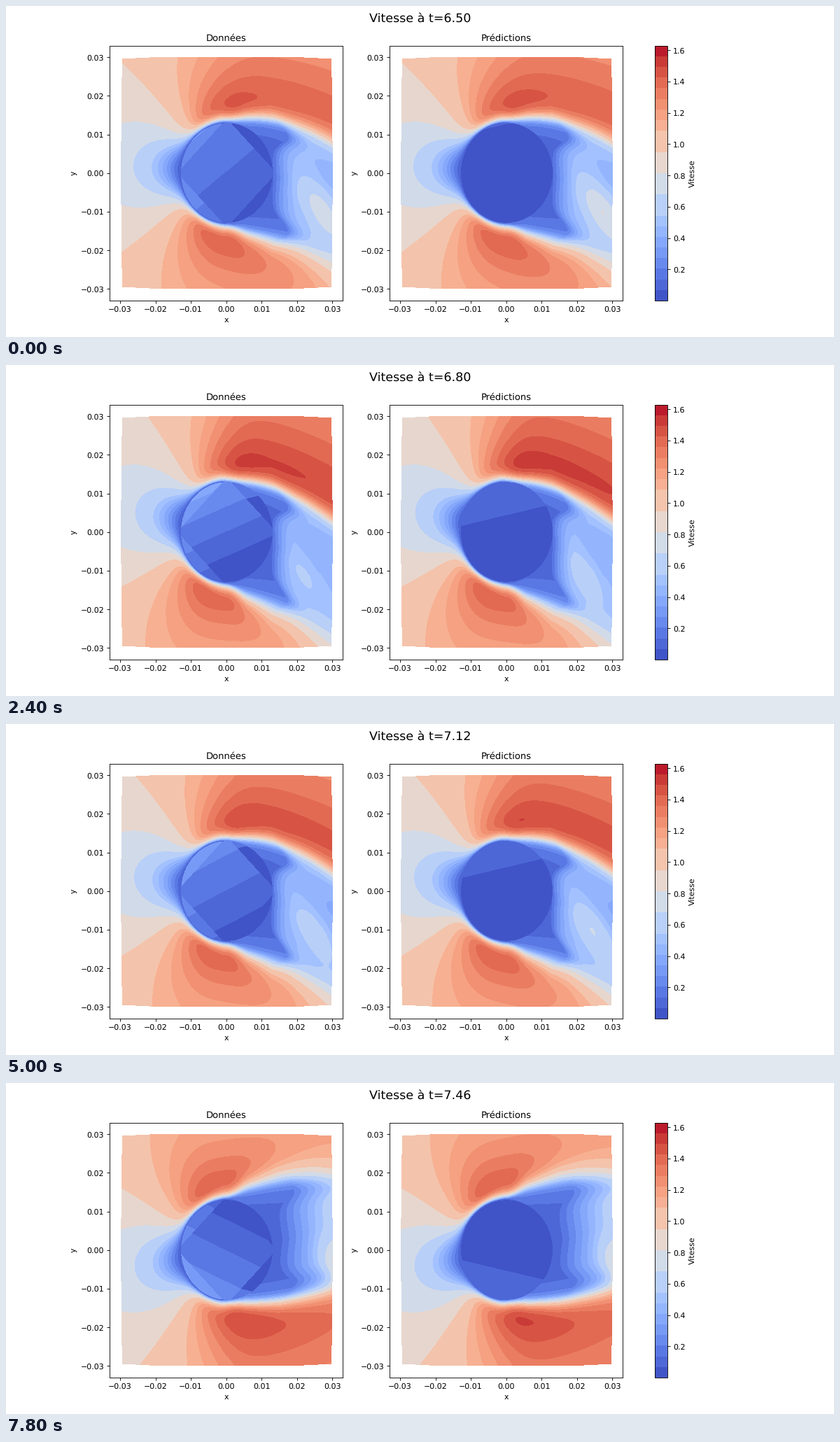
Write a matplotlib script that moves like this. It is 1183 px wide and 473 px high and loops after 8 s.

```python
import numpy as np
import matplotlib.pyplot as plt
from matplotlib.animation import FuncAnimation
from matplotlib.colors import ListedColormap

plt.rcParams["text.hinting"] = "none"

DPI = 78.875
FRAMES, INTERVAL = 40, 200
T0, DT = 6.50, 0.02465
PERIOD = 19 / 3            # frames per vortex shedding cycle
VMIN, VMAX = 0.001, 1.629
BANDS = 24
R = 13.0                   # cylinder radius, mm
HALF = 30.1                # half width of the image, mm
TAU = 2 * np.pi

x, y = np.meshgrid(np.linspace(-HALF, HALF, 304), np.linspace(-HALF, HALF, 333))
r = np.hypot(x, y)
down = np.maximum(x, 0)
outside = ((np.abs(y) > 30 - 0.045 * np.maximum(np.abs(x) - 20, 0))
           | (np.abs(x) > 30 - 0.012 * np.abs(y)))
cylinder = r < 12.9


def smooth(v, lo, hi):
    t = np.clip((v - lo) / (hi - lo), 0, 1)
    return t * t * (3 - 2 * t)


def band_colors():
    """Coolwarm steps, with the pale middle ones joined in pairs."""
    mid = [(i // 2 * 2 + 1 if 8 <= i < 16 else i + 0.5) / BANDS
           for i in range(BANDS)]
    return ListedColormap(plt.get_cmap("coolwarm")(mid))


def shear_edge(phase):
    """Height of the upper wake edge and how far it swings outward."""
    swing = np.cos(TAU * (phase - 0.29 - 0.002 * down))
    height = 14.4 + 0.2 * down - 0.005 * down**2
    reach = 0.9 + 0.18 * down + 0.0082 * down**2
    return height + reach * swing, swing


def outer_speed(lean, gain):
    """Dipole flow turned by the lift, stretched downstream."""
    z = (x + 1j * y) * np.exp(0.3j * lean)
    zs = 0.625 * z.real - 0.375 * np.hypot(z.real, 4) + 1j * z.imag
    dist = 14 + 0.6 * (np.abs(zs) - R)
    flow = 0.97 * np.abs(1 - 140 / dist**2 * np.exp(-2j * np.angle(zs)))
    side = np.tanh(y / 4)
    boost = (gain + 0.1 * lean * side) * (0.5 + 0.5 * np.tanh(x / 7))
    front = np.maximum(-z.real / np.maximum(r, 1), 0) ** 8
    return flow * (1 + boost), front


def patch(phase, yy, extra):
    """Faster fluid drawn into the wake and carried downstream."""
    p = (phase + 0.5) % 1 - 0.5
    amp = np.clip(0.3 + extra + 1.8 * p, 0, 0.45)
    dy = yy + 10
    u = x - 27 - 55 * p + 0.55 * dy
    return amp * np.exp(-(u / 4.8) ** 2 - (dy / 9) ** 2)


def wake_speed(phase, edge, extra):
    slow = 0.5 + 0.5 * np.cos(2 * TAU * (phase - 0.19))
    start = 12.3 + 2 * slow + 4.5 * np.exp(-((edge + 4) / 3.2) ** 2)
    t = np.clip((x - start) / (6 + 12 * slow), 0, 1)
    t = t * (1 + (1 - t) * (1 - slow))
    jets = patch(phase, y, extra) + patch(phase + 0.5, -y, extra)
    return 0.075 + (0.32 + 0.3 * slow) * t + jets * smooth(x, 11, 20)


def inside_data(lean):
    """Flat facets spanning the cylinder, cut by a diamond."""
    s = y * lean - 0.22 * x * abs(lean)
    v = 0.135 + 0.013 * s - 0.002 * x
    corner = np.abs(x) + np.abs(y) > 14
    v = np.where(corner & (x > 0), np.minimum(v, 0.06) + 0.1 * (s > 6), v)
    v = np.where(corner & (x <= 0), v + 0.08, v)
    return np.clip(v, 0.02, 0.36)


def inside_prediction(lean):
    s = y * lean - 0.22 * x * abs(lean)
    return np.clip(0.06 + 0.0025 * s, 0.01, 0.13)


def field(phase, predicted):
    lean = -np.sin(TAU * (phase - 0.045))
    extra = 0.06 if predicted else 0.0
    speed, front = outer_speed(lean, 0.07 if predicted else 0.06)

    top, top_swing = shear_edge(phase)
    low, low_swing = shear_edge(phase + 0.5)
    upper = y > (top - low) / 2
    swing = np.maximum(np.where(upper, top_swing, low_swing), 0)
    edge = np.maximum(y - top, -y - low)

    m = smooth(x, -3, 6)
    near = 0.9 + 2.7 * front + 0.6 * smooth(x, -9, 0)
    far = (1.5 + 0.05 * down) * (1 + 0.05 * down * swing)
    width = (1 - m) * near + m * far
    depth = (1 - m) * (r - R) + m * (edge + width * (0.72 - 0.006 * down))
    depth = 0.5 * (depth + np.hypot(depth, 0.5 * width * m))

    wake = wake_speed(phase, edge, extra)
    v = wake + (speed - wake) * (1 - np.exp(-depth / width))
    inner = inside_prediction(lean) if predicted else inside_data(lean)
    v = np.where(cylinder, inner, v)
    return np.ma.array(np.clip(v, VMIN, VMAX), mask=outside)


fig, axes = plt.subplots(1, 2, figsize=(1183.01 / DPI, 473.01 / DPI), dpi=DPI)
cmap = band_colors()
images = []
for i, (ax, name) in enumerate(zip(axes, ("Données", "Prédictions"))):
    ext = HALF / 1000
    im = ax.imshow(field(0, i == 1), cmap=cmap, vmin=VMIN, vmax=VMAX,
                   origin="lower", extent=(-ext, ext, -ext, ext),
                   aspect="auto", interpolation="nearest")
    ticks = np.arange(-3, 4) / 100
    ax.set(title=name, xlabel="x", ylabel="y", xticks=ticks, yticks=ticks,
           xlim=(-0.033, 0.033), ylim=(-0.033, 0.033))
    images.append(im)
fig.colorbar(images[0], ax=list(axes), label="Vitesse",
             ticks=np.arange(1, 9) / 5)
heading = fig.suptitle("", fontsize=16)


def update(k):
    phase = k / PERIOD % 1
    for i, im in enumerate(images):
        im.set_data(field(phase, i == 1))
    heading.set_text(f"Vitesse à t={T0 + DT * k:.2f}")
    return [*images, heading]


anim = FuncAnimation(fig, update, frames=FRAMES, interval=INTERVAL,
                     repeat=True, repeat_delay=0)
plt.show()
```
